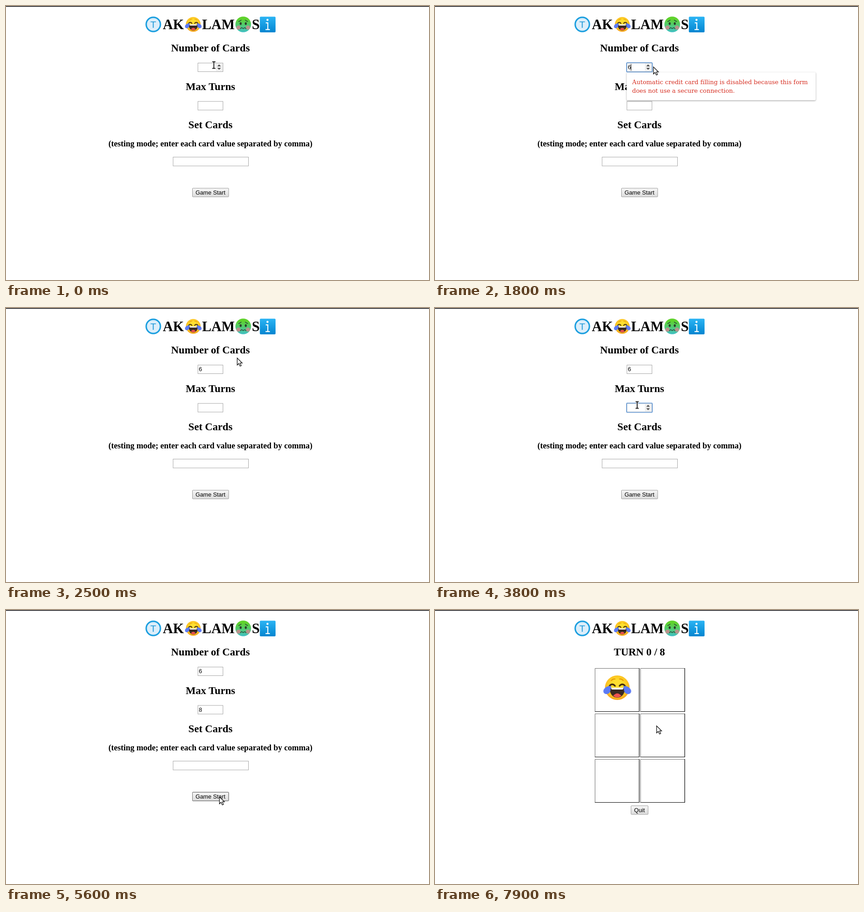
These frames come from a looping animation (929 px wide and 603 px high, 8000 ms). An HTML page:

```html
<!DOCTYPE html>
<html lang="en">
<head>
<meta charset="utf-8">
<title>Emoji pairs</title>
<style>
  html, body { margin: 0; width: 100%; height: 100%; overflow: hidden; background: #fff; }
  svg { display: block; }
  text { text-anchor: middle; white-space: pre; }
  .head { font: bold 23.1px "Liberation Serif", serif; }
  .logo { font: bold 30.8px "Liberation Serif", serif; }
  .note { font: bold 18.02px "Liberation Serif", serif; }
  .ui { font: 12.83px "Liberation Sans", sans-serif; }
  .left { text-anchor: start; }
  .warn { font: 13.12px "DejaVu Serif", serif; fill: #d62d20; text-anchor: start; }
  #popup rect { filter: drop-shadow(0 1px 1.5px rgba(0, 0, 0, .42)); }
</style>
</head>
<body>
<svg width="929" height="603" viewBox="0 0 929 603">
  <defs>
    <radialGradient id="gold" cy=".45" r=".55">
      <stop offset=".45" stop-color="#ffdf30"/><stop offset=".8" stop-color="#fcc421"/><stop offset="1" stop-color="#f59a1c"/>
    </radialGradient>
    <linearGradient id="green" x2="0" y2="1">
      <stop offset=".15" stop-color="#5fd22c"/><stop offset="1" stop-color="#41c0c4"/>
    </linearGradient>
    <linearGradient id="blue" x2="0" y2="1">
      <stop offset="0" stop-color="#2bb4f4"/><stop offset="1" stop-color="#0385d0"/>
    </linearGradient>
    <linearGradient id="steel" x2="0" y2="1">
      <stop offset="0" stop-color="#f7f7f7"/><stop offset="1" stop-color="#dcdcdc"/>
    </linearGradient>
    <g id="joy">
      <circle r="27" fill="url(#gold)"/>
      <path d="M-17 -4Q-11 -11 -5 -4M17 -4Q11 -11 5 -4" fill="none" stroke="#422b0d" stroke-width="3.4" stroke-linecap="round"/>
      <path d="M-13 -16Q-9 -20 -5 -19M13 -16Q9 -20 5 -19" fill="none" stroke="#e59600" stroke-width="2" stroke-linecap="round"/>
      <path d="M-17 0H17C17 13 10 22 0 22S-17 13 -17 0Z" fill="#3a2a22"/>
      <path d="M-14 0H14L12 4H-12Z" fill="#fff"/>
      <path d="M-9 18Q0 7 9 18Q0 25 -9 18Z" fill="#ef5350"/>
      <g id="tear"><path d="M-13 -3C-20 -6 -30 1 -30.5 7C-31 15 -21 16 -17 11C-14 7 -15 2 -13 -3Z" fill="#5c7bf5"/></g>
      <use href="#tear" transform="scale(-1 1)"/>
    </g>
    <g id="spinner">
      <rect x="461" y="126.5" width="14.5" height="17" fill="#efefef"/>
      <path d="M464 132.8l4-4 4 4zM464 136.2l4 4 4-4z" fill="#444"/>
    </g>
    <rect id="field" x="421.5" y="125.5" width="55" height="19" fill="#fff" stroke="#a6a6a6"/>
    <g id="ring" fill="none">
      <rect x="420.8" y="124.8" width="56.4" height="20.4" rx="1.5" stroke="#5b96d8" stroke-width="1.6"/>
    </g>
    <path id="caret" d="M423.5 127.5v15" stroke="#000"/>
    <g id="card">
      <rect width="98" height="96" fill="#fff"/>
      <path d="M.5 96V.5H98" fill="none" stroke="#6a6a6a"/>
      <path d="M97.5 0V95.5H0" fill="none" stroke="#000" stroke-width="1.2"/>
    </g>
  </defs>

  <rect width="929" height="603" fill="#fff"/>
  <rect width="929" height="1.7" fill="#222226"/>

  <g class="logo">
    <circle cx="323.5" cy="40.5" r="15.6" fill="#dceefa" stroke="#1c9fdf" stroke-width="3.2"/>
    <text x="323.5" y="48" fill="#2199d8" style="font: 21px 'Liberation Sans', sans-serif">T</text>
    <text x="367.5" y="51">AK</text>
    <use href="#joy" transform="translate(411.3 40.5) scale(.6)"/>
    <text x="466.5" y="51">LAM</text>
    <g transform="translate(521 40.5)">
      <circle r="17.2" fill="url(#green)"/>
      <circle cx="-10.5" cy="7" r="4.6" fill="#d5868a" opacity=".8"/>
      <circle cx="10.5" cy="7" r="4.6" fill="#d5868a" opacity=".8"/>
      <ellipse cx="-5.6" cy="-1.8" rx="2.2" ry="3" fill="#2b3b2b"/>
      <ellipse cx="5.6" cy="-1.8" rx="2.2" ry="3" fill="#2b3b2b"/>
      <path d="M-10 -6.5Q-7 -7 -4.5 -9.5M10 -6.5Q7 -7 4.5 -9.5M-6 9.5Q-4 6 -2 8T2 8T6 9.5" fill="none" stroke="#2b4a35" stroke-width="1.6" stroke-linecap="round"/>
    </g>
    <text x="548.5" y="51">S</text>
    <rect x="557.5" y="23.5" width="34.5" height="34.5" rx="2" fill="url(#blue)"/>
    <circle cx="574.3" cy="30.6" r="2.3" fill="#fff"/>
    <path d="M570.5 37.2H575V51.5M570 51.8H579.5" fill="none" stroke="#fff" stroke-width="2.2"/>
  </g>

  <g id="form">
    <g class="head">
      <text x="449" y="100">Number of Cards</text>
      <text x="449" y="184.6">Max Turns</text>
      <text x="449" y="269">Set Cards</text>
    </g>
    <text class="note" x="449" y="309">(testing mode; enter each card value separated by comma)</text>
    <rect x="367" y="332.5" width="165.5" height="19.5" fill="#fff" stroke="#a6a6a6"/>
    <rect x="409.5" y="401" width="79.5" height="19" rx="1" fill="url(#steel)" stroke="#9a9a9a"/>
    <rect id="hover" x="409.5" y="401" width="79.5" height="19" rx="1" fill="none" stroke="#737373"/>
    <text class="ui" x="449" y="415">Game Start</text>

    <use href="#field"/>
    <use href="#spinner" id="spin1"/>
    <use href="#ring" id="ring1"/>
    <use href="#caret" id="caret1"/>
    <text class="ui left" id="digit1" x="423.5" y="139.3">6</text>

    <g transform="translate(0 84.5)">
      <use href="#field"/>
      <use href="#spinner" id="spin2"/>
      <use href="#ring" id="ring2"/>
      <use href="#caret" id="caret2"/>
      <text class="ui left" id="digit2" x="423.5" y="139.3">8</text>
    </g>

    <g id="popup">
      <rect x="421" y="146" width="415" height="61.5" rx="2" fill="#fff"/>
      <text class="warn" x="433" y="171.7">Automatic credit card filling is disabled because this form</text>
      <text class="warn" x="433" y="191">does not use a secure connection.</text>
    </g>
  </g>

  <g id="board">
    <text class="head" x="449" y="100">TURN 0 / 8</text>
    <g id="cards"></g>
    <use href="#joy" id="match" x="400.3" y="171"/>
    <rect x="430.5" y="430.8" width="37.5" height="19" rx="1" fill="url(#steel)" stroke="#9a9a9a"/>
    <text class="ui" x="449" y="445">Quit</text>
  </g>

  <g id="pointer">
    <g id="beam" fill="none" stroke-linejoin="round">
      <path d="M-3.5 -7.3H3.5M0 -7V7M-3.5 7.3H3.5" stroke="#fff" stroke-width="3.6"/>
      <path d="M-3.5 -7.3H-1L0 -6.5 1 -7.3H3.5M0 -6.5V6.5M-3.5 7.3H-1L0 6.5 1 7.3H3.5" stroke="#000" stroke-width="1.7"/>
    </g>
    <path id="arrow" d="M.7 1V16.6L4.4 13.2 7 19 9.7 17.9 7.2 12.2H11.8Z" fill="#fff" stroke="#111" stroke-width="1.3"/>
  </g>
</svg>
<script>
const LOOP = 8000;
const byId = id => document.getElementById(id);

for (let i = 0; i < 6; i++) {
  const card = document.createElementNS("http://www.w3.org/2000/svg", "use");
  card.setAttribute("href", "#card");
  card.setAttribute("x", 351 + i % 2 * 100);
  card.setAttribute("y", 128 + Math.floor(i / 2) * 100);
  byId("cards").append(card);
}

// Each step is [time, value]; a value holds until the next step.
function hold(id, property, steps) {
  const frames = steps.map(([time, value]) => ({ offset: time / LOOP, [property]: value, easing: "steps(1, end)" }));
  frames.push({ offset: 1, [property]: steps.at(-1)[1] });
  byId(id).animate(frames, { duration: LOOP, iterations: Infinity });
}

// Shown from the first time to the second, and so on in turn.
const show = (id, ...times) =>
  hold(id, "opacity", [...(times[0] ? [[0, 0]] : []), ...times.map((time, i) => [time, i % 2 ? 0 : 1])]);

const path = [
  [0, 456.5, 130], [500, 450, 131], [600, 444, 132],
  [1500, 447, 131], [1600, 455, 131], [1700, 466, 132], [1800, 479, 133], [1900, 490, 137],
  [2000, 496, 139], [2100, 499, 130], [2200, 503, 119], [2300, 506, 112], [2400, 507, 109],
  [3000, 444, 213.5], [4300, 485, 215], [4500, 643, 215], [4700, 643, 213],
  [5000, 565, 268], [5200, 502, 366], [5400, 473, 405], [5600, 468, 410],
  [6800, 435, 203], [7000, 429, 199], [7700, 474, 241], [7900, 486, 254]
];
hold("pointer", "transform", path.map(([time, x, y]) => [time, `translate(${x}px, ${y}px)`]));
show("beam", 0, 1800, 3000, 4300);
show("arrow", 1800, 3000, 4300);

show("form", 0, 5900);
show("board", 5900);
show("match", 7300);
show("hover", 5400);

show("spin1", 0, 2400);
show("ring1", 800, 2400);
show("caret1", 800, 2400);
show("digit1", 1400);
hold("caret1", "transform", [[0, "none"], [1400, "translate(7px, 0)"]]);
hold("popup", "opacity", [[0, 0], [800, 1], [2400, .35], [2500, 0]]);

show("spin2", 3000, 4900);
show("ring2", 3200, 4900);
show("caret2", 3200, 3800, 4300, 4900);
show("digit2", 4300);
hold("caret2", "transform", [[0, "none"], [4300, "translate(7px, 0)"]]);
</script>
</body>
</html>
```
